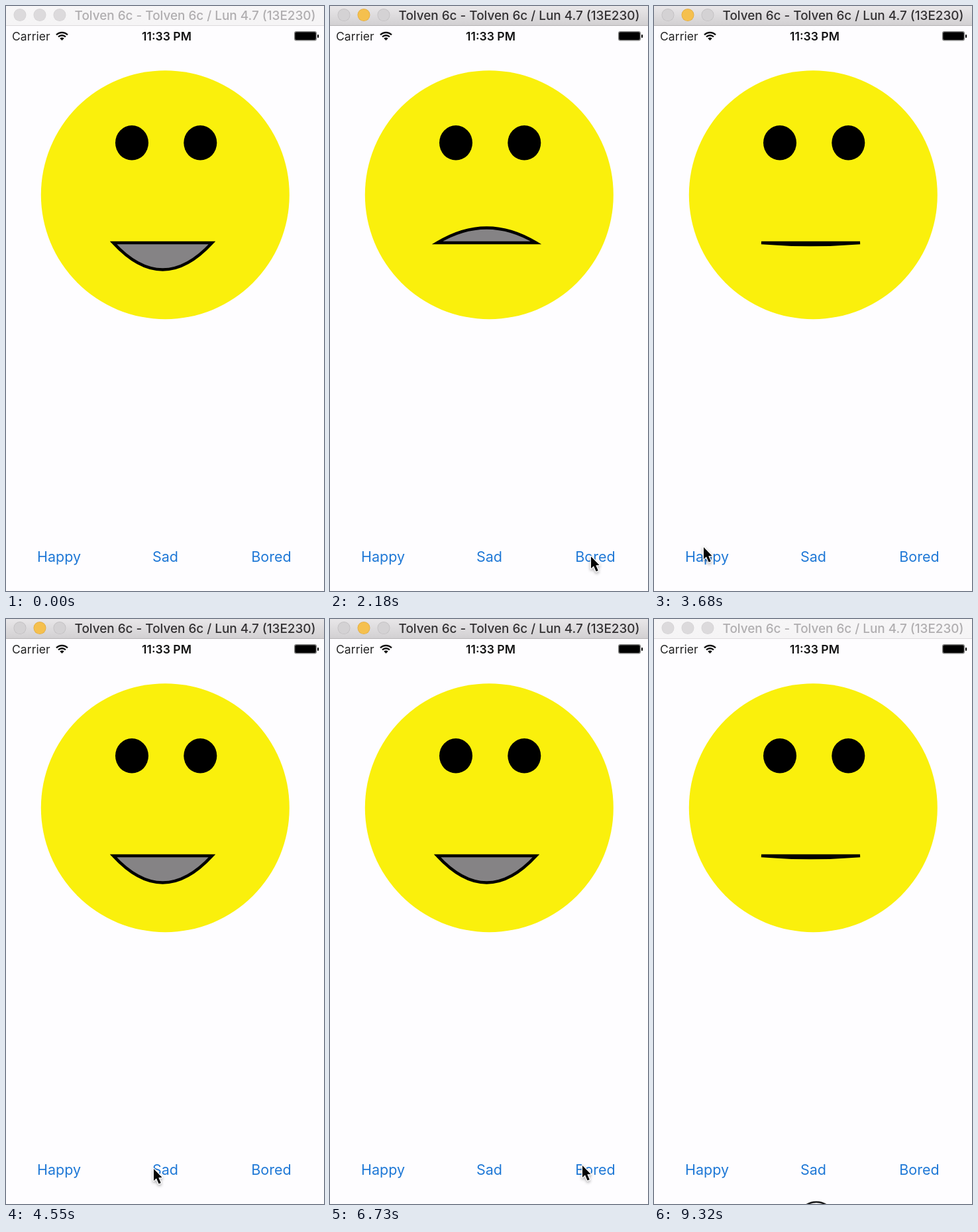
An HTML page with a canvas for the animation above (9.37 s loop, 480 px wide and 882 px high).

```html
<!DOCTYPE html>
<html lang="en">
<head>
<meta charset="utf-8">
<title>Mood face</title>
<style>
  html, body { margin: 0; width: 100%; height: 100%; overflow: hidden; background: #fefdff; }
  canvas { display: block; width: 100vw; height: 100vh; }
</style>
</head>
<body>
<canvas id="stage" width="480" height="882"></canvas>
<script>
const ctx = document.getElementById('stage').getContext('2d');
const LOOP = 9370;
const FONT = 'Inter, Roboto, sans-serif';
const ACTIVE_FROM = 1200, ACTIVE_TO = 8400;
const RING_FROM = 9250;
const MORPH = 250, FADE = 250, PRESS = 90;

// Bend of the mouth's control point below its straight edge
const BEND = { Happy: 81, Sad: -45, Bored: 6 };
const BUTTONS = { Happy: 80, Sad: 240.5, Bored: 400.5 };

// Moments when a button is released
const CLICKS = [
  [1500, 'Sad'], [2350, 'Bored'], [3840, 'Happy'],
  [4710, 'Sad'], [6070, 'Happy'], [7537, 'Bored']
];

// Pointer stops: arrival, departure, x, y
const STOPS = [
  [0, 350, 232, 900], [900, 1600, 232, 831], [2050, 2450, 394, 830],
  [3350, 3950, 75, 816], [4400, 4820, 223, 829], [5650, 6170, 106, 821],
  [6680, 7800, 381, 824], [8400, LOOP, 250, 900]
];

const clamp = v => Math.max(0, Math.min(1, v));
const mix = (a, b, p) => a + (b - a) * p;
const smooth = p => p * p * (3 - 2 * p);

function text(str, x, y, size, color, weight = 400, align = 'center') {
  ctx.font = `${weight} ${size}px ${FONT}`;
  ctx.textAlign = align;
  ctx.fillStyle = color;
  ctx.fillText(str, x, y);
}

function ellipse(x, y, rx, ry, color) {
  ctx.beginPath();
  ctx.ellipse(x, y, rx, ry, 0, 0, Math.PI * 2);
  ctx.fillStyle = color;
  ctx.fill();
}

function box(x, y, w, h, r, color) {
  ctx.beginPath();
  ctx.roundRect(x, y, w, h, r);
  ctx.fillStyle = color;
  ctx.fill();
}

function mouthBend(t) {
  let bend = BEND.Happy;
  for (const [at, mood] of CLICKS) {
    if (t >= at) bend = mix(bend, BEND[mood], clamp((t - at) / MORPH));
  }
  return bend;
}

function buttonAlpha(name, t) {
  let alpha = 1;
  for (const [at, mood] of CLICKS) {
    if (mood !== name || t < at - PRESS || t > at + FADE) continue;
    const p = clamp((t - at) / FADE);
    alpha = mix(0.25, 1, 1 - (1 - p) ** 2);
  }
  return alpha;
}

function pointerAt(t) {
  let i = STOPS.length - 1;
  while (i > 0 && STOPS[i][0] > t) i--;
  const [, leave, x, y] = STOPS[i];
  const next = STOPS[i + 1];
  if (!next || t <= leave) return [x, y];
  const p = smooth((t - leave) / (next[0] - leave));
  return [mix(x, next[2], p), mix(y, next[3], p)];
}

function titleBar(active) {
  const fill = ctx.createLinearGradient(0, 0, 0, 29);
  fill.addColorStop(0, active ? '#e9e7e9' : '#f7f6f7');
  fill.addColorStop(1, active ? '#d2d0d2' : '#f5f4f5');
  ctx.fillStyle = fill;
  ctx.fillRect(0, 0, 480, 29);
  ctx.fillStyle = active ? '#b5b3b5' : '#dcdadc';
  ctx.fillRect(0, 29, 480, 1);

  [21, 51, 81].forEach((x, i) => {
    const amber = active && i === 1;
    ellipse(x, 13.5, 9.5, 9.5, amber ? '#e0ab42' : active ? '#c0bec0' : '#d5d3d5');
    ellipse(x, 13.5, 8.7, 8.7, amber ? '#f5c04e' : active ? '#d4d2d4' : '#dcdadc');
  });
  text('Tolven 6c - Tolven 6c / Lun 4.7 (13E230)', 285.5, 20.5, 18.9,
    active ? '#333133' : '#b0aeb0', 450);
}

function wifi() {
  const x = 84.5, y = 52;
  const from = -Math.PI * 0.75, to = -Math.PI * 0.25;
  ctx.strokeStyle = '#111';
  ctx.lineWidth = 2.4;
  for (const r of [12, 7.8]) {
    ctx.beginPath();
    ctx.arc(x, y, r, from, to);
    ctx.stroke();
  }
  ctx.beginPath();
  ctx.moveTo(x, y);
  ctx.arc(x, y, 4.6, from, to);
  ctx.fillStyle = '#111';
  ctx.fill();
}

function statusBar() {
  text('Carrier', 9, 52, 17.6, '#222', 400, 'left');
  wifi();
  text('11:33 PM', 242.5, 52, 17.6, '#111', 600);
  box(435, 38, 34, 14.5, 3, '#808080');
  box(436.4, 39.4, 31.2, 11.7, 2, '#000');
  box(470, 43, 2, 5, 1, '#000');
}

function face(bend) {
  ellipse(240.3, 284.7, 187.5, 187.5, '#faf00c');
  ellipse(190, 206.3, 25, 26.3, '#000');
  ellipse(293.3, 206.3, 25, 26.3, '#000');

  ctx.beginPath();
  ctx.moveTo(162, 357);
  ctx.quadraticCurveTo(236.5, 357 + bend, 311, 357);
  ctx.closePath();
  ctx.fillStyle = '#858385';
  ctx.fill();
  ctx.strokeStyle = '#000';
  ctx.lineWidth = 4.6;
  ctx.lineJoin = 'miter';
  ctx.miterLimit = 10;
  ctx.stroke();
}

function buttons(t) {
  for (const name in BUTTONS) {
    ctx.globalAlpha = buttonAlpha(name, t);
    text(name, BUTTONS[name], 838, 21.5, '#1f78d6');
  }
  ctx.globalAlpha = 1;
}

function pointer([x, y]) {
  ctx.save();
  ctx.translate(x, y);
  ctx.beginPath();
  ctx.moveTo(0, 0);
  ctx.lineTo(0, 18);
  ctx.lineTo(4, 14.3);
  ctx.lineTo(7.6, 22.6);
  ctx.lineTo(10.8, 21.2);
  ctx.lineTo(7.3, 13.2);
  ctx.lineTo(12.6, 13);
  ctx.closePath();
  ctx.lineJoin = 'round';
  ctx.lineWidth = 2.6;
  ctx.strokeStyle = '#fff';
  ctx.shadowColor = 'rgba(0,0,0,.35)';
  ctx.shadowBlur = 4;
  ctx.shadowOffsetY = 2;
  ctx.stroke();
  ctx.shadowColor = 'transparent';
  ctx.fillStyle = '#050505';
  ctx.fill();
  ctx.restore();
}

function ring() {
  ctx.beginPath();
  ctx.arc(245, 907, 28, 0, Math.PI * 2);
  ctx.strokeStyle = '#1a1a1a';
  ctx.lineWidth = 2.6;
  ctx.stroke();
}

function draw(now) {
  const t = now % LOOP;
  ctx.fillStyle = '#fefdff';
  ctx.fillRect(0, 0, 480, 882);
  titleBar(t >= ACTIVE_FROM && t < ACTIVE_TO);
  statusBar();
  face(mouthBend(t));
  buttons(t);
  pointer(pointerAt(t));
  if (t >= RING_FROM) ring();
}

function tick() {
  draw(performance.now());
  requestAnimationFrame(tick);
}
tick();
</script>
</body>
</html>
```
